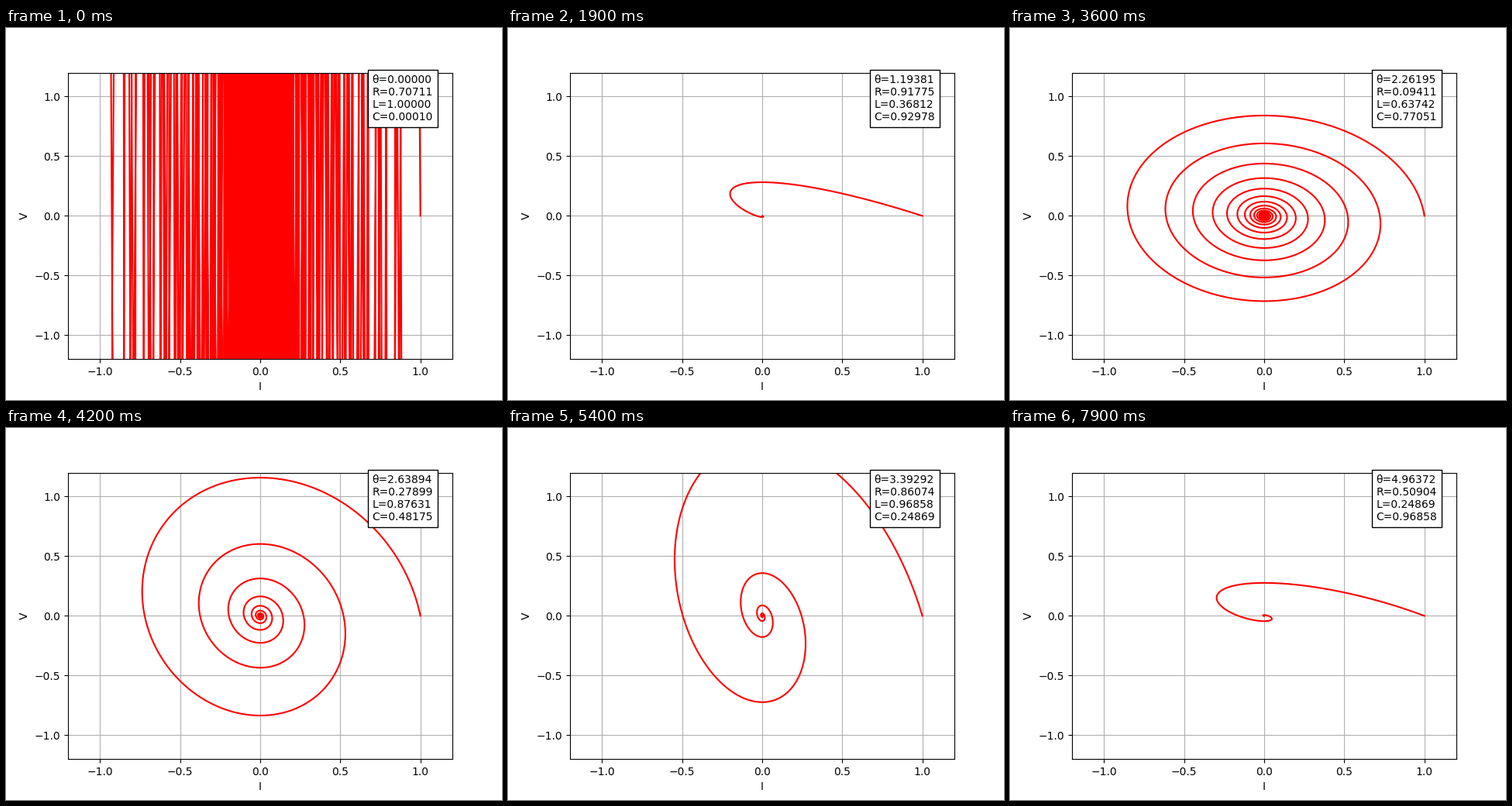
These frames come from a looping animation (640 by 480 pixels, 8000 ms). A matplotlib script:

```python
import numpy as np
import matplotlib.pyplot as plt
from matplotlib.animation import FuncAnimation

FRAMES = 80
STEPS_PER_TURN = 100
FLOOR = 1e-4  # keeps L and C away from zero

t = np.arange(0, 100, 0.01)


def circuit(theta):
    """Component values R, L, C for one sweep angle."""
    r = abs(np.sin(theta + np.pi / 4))
    l = max(abs(np.cos(theta)), FLOOR)
    c = max(abs(np.sin(theta)), FLOOR)
    return r, l, c


def response(r, l, c):
    """Free response of a series RLC circuit with I(0)=1, V(0)=0."""
    damping = r / (2 * l)
    root = np.sqrt(complex(damping ** 2 - 1 / (l * c)))
    p, q = -damping + root, -damping - root
    ep, eq = np.exp(p * t), np.exp(q * t)
    current = (p * ep - q * eq) / (p - q)
    voltage = (ep - eq) / ((p - q) * c)
    return current.real, voltage.real


fig, ax = plt.subplots(figsize=(6.4, 4.8), dpi=100)
ax.set(xlim=(-1.2, 1.2), ylim=(-1.2, 1.2), xlabel="I", ylabel="V")
ax.set_xticks(np.arange(-1, 1.1, 0.5))
ax.set_yticks(np.arange(-1, 1.1, 0.5))
ax.grid(True)

curve, = ax.plot([], [], color="red", lw=1.5)
info = ax.text(0.7, 0.7805, "", va="bottom",
               bbox=dict(facecolor="white", edgecolor="black"))


def update(i):
    theta = 2 * np.pi * i / STEPS_PER_TURN
    r, l, c = circuit(theta)
    curve.set_data(*response(r, l, c))
    info.set_text(f"θ={theta:.5f}\nR={r:.5f}\nL={l:.5f}\nC={c:.5f}")
    return curve, info


anim = FuncAnimation(fig, update, frames=FRAMES, interval=100,
                     repeat=True, repeat_delay=0)
plt.show()
```
